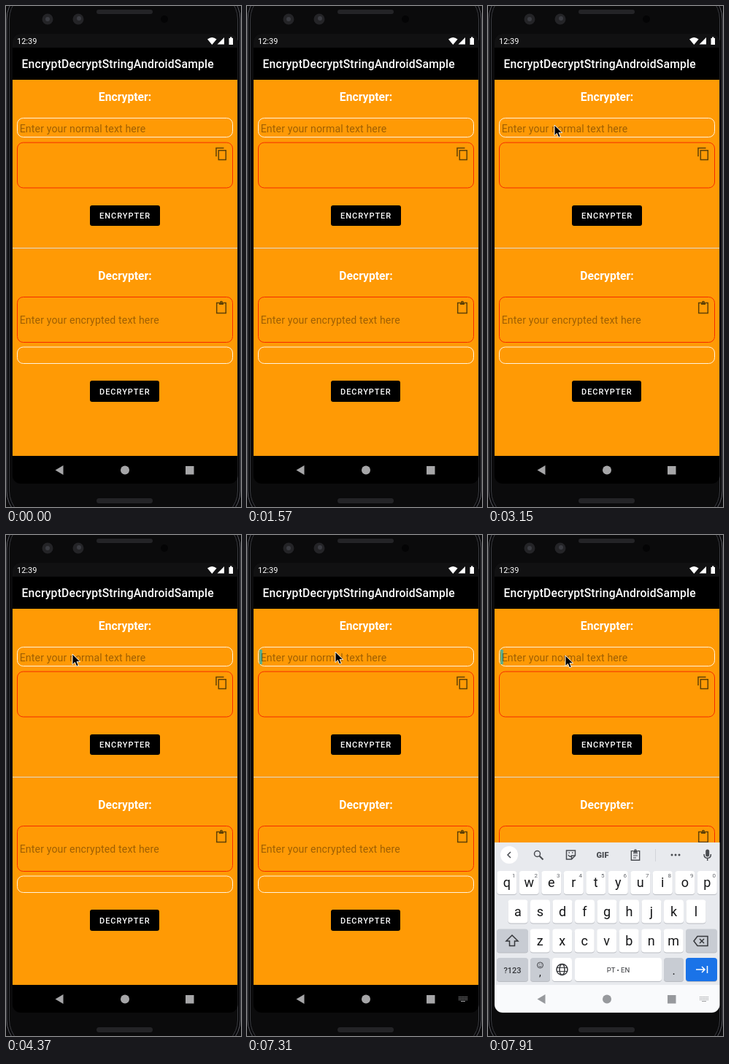
An HTML page for the animation above (8000 ms loop, 322 by 686 pixels).

```html
<!DOCTYPE html>
<html lang="en">
<head>
<meta charset="utf-8">
<title>Encrypt and decrypt</title>
<style>
html, body { margin: 0; width: 100%; height: 100%; overflow: hidden; background: #08080a; }
svg { display: block; width: 322px; height: 686px; font-family: Roboto, sans-serif; }
.heading { font-size: 15.7px; font-weight: 700; fill: #fff; text-anchor: middle; }
.hint { font-size: 14.12px; letter-spacing: .0094em; fill: #000; fill-opacity: .38; }
.button { font-size: 11px; font-weight: 500; letter-spacing: .0893em; fill: #fff; }
.field { fill: none; stroke-width: 1; }
.pale { stroke: #fff3dc; }
.red { stroke: #f42a00; }
.line { fill: none; stroke-width: 1.5; }
.key { font-size: 18px; text-anchor: middle; fill: #151618; }
.small { font-size: 8px; text-anchor: middle; fill: #62656a; }
</style>
</head>
<body>
<svg viewBox="0 0 322 686">
  <defs>
    <clipPath id="screen"><rect x="9" y="38" width="308.500" height="616" rx="11"/></clipPath>
    <clipPath id="aboveNav"><rect x="9" y="38" width="309" height="578"/></clipPath>
    <g id="keyboardIcon" stroke="currentColor" fill="none">
      <path d="M290 632.500h12M290 634.500h12M290 636.500h12" stroke-dasharray="1.300 .84"/>
      <path d="M293 638.500h6"/>
    </g>
    <g id="clipboard" class="line">
      <path d="M-3 -6.500h-3.300v14h12.600v-14h-3.300"/>
      <path d="M-3 -7h6v3h-6z" fill="currentColor" stroke="none"/>
      <circle cy="-7" r="1.400"/>
    </g>
  </defs>

  <!-- Phone body -->
  <rect width="322" height="686" fill="#0c0c0e"/>
  <rect x="1" y="-24" width="320" height="730" rx="42" fill="#09090b" stroke="#5a5b62"/>
  <rect x="4.500" y="-20" width="313" height="722" rx="38" fill="#0b0b0c" stroke="#3a3b40"/>
  <g fill="#242427">
    <rect x="124" y="5" width="77" height="6" rx="3"/>
    <rect x="124" y="674" width="77" height="7" rx="3.500"/>
    <circle cx="57" cy="18" r="7.500"/><circle cx="99" cy="18" r="7.500"/>
  </g>
  <g fill="#3b3c42"><circle cx="57" cy="18" r="3"/><circle cx="100" cy="17" r="3"/></g>
  <circle cx="217" cy="18" r="5" fill="#040405"/>

  <g clip-path="url(#screen)">
    <rect x="9" y="38" width="309" height="616" fill="#000"/>
    <rect x="9" y="38" width="309" height="19" fill="#111112"/>
    <g fill="#fff">
      <text x="15" y="52" font-size="11">12:39</text>
      <path d="M276 45.500q6.300-5 12.600 0L282.300 53zM299 43v9.500h-9.500z"/>
      <path d="M305.500 44h1.500v-1.500h2.500v1.500h1.500v9h-5.500z"/>
      <text x="21.500" y="85" font-size="15.700" font-weight="500" letter-spacing=".2">EncryptDecryptStringAndroidSample</text>
    </g>

    <rect x="9" y="101" width="308" height="515" fill="#ff9a05"/>
    <path d="M9 331.500h308" stroke="#dedad2"/>
    <text class="heading" x="163" y="130">Encrypter:</text>
    <text class="heading" x="163" y="374.500">Decrypter:</text>
    <rect class="field pale" x="15.500" y="153.500" width="295" height="26" rx="8"/>
    <rect class="field red" x="15.500" y="187" width="295" height="62" rx="8"/>
    <rect class="field red" x="15.500" y="398.500" width="295" height="62" rx="8"/>
    <rect class="field pale" x="15.500" y="467" width="295" height="22.500" rx="8"/>
    <rect id="caret" x="17" y="157" width="4" height="20" fill="#62ad86"/>
    <text class="hint" x="18.700" y="172.500">Enter your normal text here</text>
    <text class="hint" x="18.700" y="434.500">Enter your encrypted text here</text>

    <g class="line" stroke="#604206" color="#604206">
      <path d="M288 206v-11.500h10.500M291.300 197.700h10v12.800h-10z"/>
      <use href="#clipboard" x="295" y="413"/>
    </g>
    <rect x="115" y="273" width="96" height="28" rx="3"/>
    <rect x="115" y="513" width="95" height="29" rx="3"/>
    <text class="button" x="128" y="291">ENCRYPTER</text>
    <text class="button" x="128" y="531.500">DECRYPTER</text>

    <g clip-path="url(#aboveNav)"><g id="keyboard"></g></g>
    <rect id="navLight" x="9" y="616" width="309" height="38" fill="#f9fafc"/>
    <g id="nav">
      <path d="M67.500 635.500l11-6.500v13z"/>
      <circle cx="163" cy="635.500" r="6"/>
      <rect x="246" y="630" width="11.500" height="11.500"/>
    </g>
    <use id="imeSwitch" href="#keyboardIcon" color="#a0a1a4"/>
  </g>

  <path id="pointer" d="M0 0v14.500l3.400-3.200 2.300 5.400 2.600-1.100-2.300-5.200h4.700z" fill="#000" stroke="#fff" stroke-width=".9"/>
</svg>

<script>
const LOOP = 8000;
const el = id => document.getElementById(id);
const show = (id, on) => el(id).setAttribute("visibility", on ? "visible" : "hidden");

const WHITE = "#fff", GRAY = "#c8ccd3", INK = "#484b50";

const keyCap = (x, y, w, fill = WHITE) =>
  `<rect x="${x}" y="${y + 1}" width="${w}" height="32" rx="4" fill="#b9bcc2"/>` +
  `<rect x="${x}" y="${y}" width="${w}" height="32" rx="4" fill="${fill}"/>`;

function letterRow(letters, x, y, digits = "") {
  return [...letters].map((letter, i) => {
    const left = x + i * 30.5;
    return keyCap(left, y, 27) +
      `<text class="key" x="${left + 13.5}" y="${y + 22}">${letter}</text>` +
      (digits ? `<text class="small" x="${left + 23}" y="${y + 9}">${digits[i]}</text>` : "");
  }).join("");
}

function buildKeyboard() {
  const toolbar = `
    <circle cx="29" cy="438" r="12" fill="${WHITE}"/>
    <g class="line" stroke="${INK}" color="${INK}">
      <path d="M31 434l-4 4 4 4"/>
      <circle cx="67.500" cy="436.500" r="4"/><path d="M70.500 439.500l5 5" stroke-width="2"/>
      <path d="M107.500 432h12v7l-5 5h-7zM119 439h-4.500v5M110 438q2 4 5 1"/>
      <path d="M110.500 435h1.500M115 435h1.500"/>
      <use href="#clipboard" transform="translate(202 438.500) scale(.9)"/>
      <path d="M199 436h6M199 439h6M199 442h4" stroke-width="1"/>
      <path d="M296 437q0 5.500 4.700 5.500t4.700-5.500M300.700 442v4"/>
    </g>
    <path d="M229.500 430v17" stroke="#d2d4d9"/>
    <text x="157" y="442" font-size="11" font-weight="900" text-anchor="middle" fill="${INK}">GIF</text>
    <g fill="${INK}">
      <circle cx="252" cy="438" r="1.500"/><circle cx="257" cy="438" r="1.500"/><circle cx="262" cy="438" r="1.500"/>
      <rect x="298.200" y="430.500" width="5" height="10" rx="2.500"/>
    </g>`;

  const controls = keyCap(12, 539.5, 43, GRAY) + keyCap(271, 539.5, 43, GRAY) +
    keyCap(12, 579, 43, GRAY) + keyCap(58, 579, 27, GRAY) + keyCap(88, 579, 27) +
    keyCap(119, 579, 119) + keyCap(241, 579, 27, GRAY) + keyCap(271, 579, 43, "#1a73e8") + `
    <g class="line" stroke="#35373b">
      <path d="M33 548l-8 8h4.500v6.500h7v-6.500h4.500z"/>
      <path d="M282 556l5-6.500h14v13h-14zM290 553l6 6M296 553l-6 6"/>
      <circle cx="101.500" cy="595" r="7.500"/><ellipse cx="101.500" cy="595" rx="3.500" ry="7.500"/>
      <path d="M94.500 592.500h14M94.500 597.500h14" stroke-width="1.200"/>
      <g stroke-width=".9"><circle cx="71.500" cy="589" r="4"/><path d="M69.500 590q2 2.500 4 0M70 587.500h1M72.500 587.500h1"/></g>
      <path d="M285 595h12M293 591l4 4-4 4M300.500 590v10" stroke="#fff"/>
    </g>
    <text x="33.500" y="599.500" font-size="11" font-weight="500" text-anchor="middle" fill="#35373b">?123</text>
    <text class="key" x="71.500" y="604" style="font-size:14px">,</text>
    <text class="key" x="254.500" y="602" style="font-size:16px">.</text>
    <text x="178.500" y="599" font-size="9.500" text-anchor="middle" fill="#35373b">PT • EN</text>`;

  el("keyboard").innerHTML =
    `<rect x="9" y="421" width="309" height="196" fill="#e8eaee"/>` + toolbar +
    letterRow("qwertyuiop", 12.3, 460, "1234567890") +
    letterRow("asdfghjkl", 27.5, 499.5) +
    letterRow("zxcvbnm", 57.7, 539.5) + controls;
}

// Pointer stops: time, x, y
const path = [
  [2300, 324, 250], [2850, 91, 163], [4850, 91, 163], [5500, 120, 156],
  [6200, 120, 156], [6600, 121, 160], [7450, 121, 160], [7850, 106, 165], [LOOP, 106, 165]
];
const clamp = v => Math.max(0, Math.min(1, v));
const smooth = v => v * v * (3 - 2 * v);

function pointerAt(t) {
  const next = Math.max(1, path.findIndex(stop => stop[0] > t));
  const [t0, x0, y0] = path[next - 1], [t1, x1, y1] = path[next];
  const k = smooth(clamp((t - t0) / (t1 - t0)));
  return [x0 + (x1 - x0) * k, y0 + (y1 - y0) * k];
}

function draw(now) {
  const t = now % LOOP;
  show("pointer", t >= path[0][0]);
  el("pointer").setAttribute("transform", `translate(${pointerAt(t)})`);

  show("caret", t >= 7100);
  show("imeSwitch", t >= 7200);

  const rise = 1 - (1 - clamp((t - 7450) / 280)) ** 3;
  show("keyboard", rise > 0);
  show("navLight", rise > 0);
  el("keyboard").setAttribute("transform", `translate(0 ${195 * (1 - rise)})`);
  el("nav").setAttribute("fill", rise > 0 ? "#97999d" : "#a6a6a8");
  requestAnimationFrame(draw);
}

buildKeyboard();
draw(0);
</script>
</body>
</html>
```
